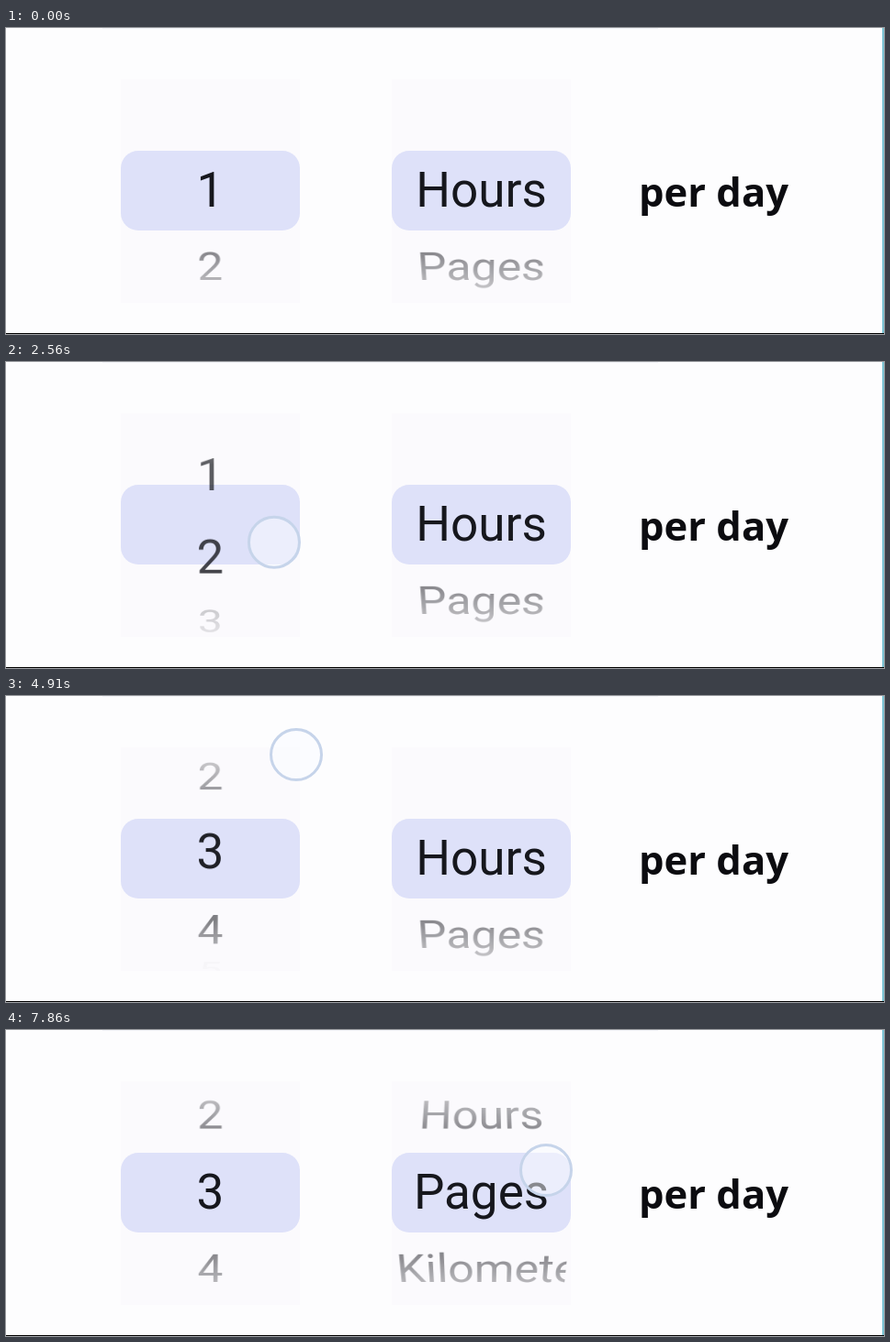
Recreate the animation shown at these times as an HTML page. Size 956 px wide and 334 px high, loop 8 s.

```html
<!DOCTYPE html>
<html lang="en">
<head>
<meta charset="utf-8">
<title>Goal picker</title>
<style>
  html, body { margin: 0; width: 100%; height: 100%; overflow: hidden; }
  #stage { position: relative; width: 956px; height: 334px; overflow: hidden; background: #fdfdfe; }
  #stage div { position: absolute; }
  .column { top: 56px; width: 195px; height: 244px; background: #fbfafd; }
  .selection { top: 77.5px; width: 100%; height: 87.5px; border-radius: 19px; background: #dee1f9; }
  .wheel {
    inset: 0; overflow: hidden;
    -webkit-mask-image: linear-gradient(#0004, #000 56px, #000 188px, #0004);
    mask-image: linear-gradient(#0004, #000 56px, #000 188px, #0004);
  }
  .item {
    top: 79px; width: 100%; height: 84px; overflow: hidden; color: #16171d;
    font: 53px/84px Roboto, sans-serif; text-align: center; white-space: nowrap;
  }
  #caption {
    left: 670.5px; top: 147.5px; width: 200px; text-align: center; white-space: nowrap;
    font: 600 43.5px/60px "Noto Sans", sans-serif; color: #0c0c10;
  }
  #touch {
    left: -29px; top: -29px; width: 58px; height: 58px; box-sizing: border-box;
    border: 3px solid #c6d4ea; border-radius: 50%; background: rgba(250, 251, 255, .5);
  }
  #topEdge { left: 105px; top: 0; width: 605px; height: 1px; background: #f2f3f8; }
  #rightEdge { right: 0; top: 0; width: 2px; height: 333px; background: #7cc4d4; }
  #bottomEdge { left: 0; bottom: 0; width: 100%; height: 1px; background: #000; }
</style>
</head>
<body>
<div id="stage">
  <div id="topEdge"></div>
  <div id="caption">per day</div>
  <div id="touch"></div>
  <div id="rightEdge"></div>
  <div id="bottomEdge"></div>
</div>
<script>
const LOOP = 8000;
const RADIUS = 122;       // half the wheel height
const STEP = 43.5;        // degrees between neighbouring items
const stage = document.getElementById('stage');
const touch = document.getElementById('touch');

// Tracks are [time, value...]
const countTrack = [[2000, 0], [2250, .2], [3120, 1.43], [3780, 2.163], [4350, 2.23], [4910, 2.075], [5400, 2]];
const unitTrack = [[6860, 0], [7000, .1], [7600, .87], [7860, 1]];
const drags = [
  { from: 1880, to: 5600, track: [[2000, 278, 263], [2250, 283, 240], [3120, 306, 113], [3780, 310, 50],
                                  [4350, 312, 41], [4910, 316, 64], [5400, 319, 75]] },
  { from: 6780, to: LOOP, track: [[6860, 566, 263], [7000, 569, 252], [7600, 585, 167], [7860, 588, 153]] }
];

function addDiv(parent, className, text = '') {
  const div = document.createElement('div');
  div.className = className;
  div.textContent = text;
  parent.append(div);
  return div;
}

function makeColumn(left, labels) {
  const column = addDiv(stage, 'column');
  column.style.left = left + 'px';
  addDiv(column, 'selection');
  const wheel = addDiv(column, 'wheel');
  return labels.map(label => addDiv(wheel, 'item', label));
}

// Smooth curve through the track with flat ends and flat turning points
function sample(track, time, channel = 1) {
  const last = track.length - 1;
  if (time <= track[0][0]) return track[0][channel];
  if (time >= track[last][0]) return track[last][channel];
  const i = track.findIndex(key => key[0] > time) - 1;
  const rate = k => (track[k + 1][channel] - track[k][channel]) / (track[k + 1][0] - track[k][0]);
  const slope = k => {
    if (k === 0 || k === last) return 0;
    const a = rate(k - 1), b = rate(k);
    return a * b > 0 ? 2 * a * b / (a + b) : 0;
  };
  const span = track[i + 1][0] - track[i][0];
  const u = (time - track[i][0]) / span, v = 1 - u;
  return v * v * (1 + 2 * u) * track[i][channel] + u * u * (3 - 2 * u) * track[i + 1][channel]
    + span * u * v * (v * slope(i) - u * slope(i + 1));
}

function turnWheel(items, position) {
  items.forEach((item, i) => {
    const angle = (i - position) * STEP;
    const visible = Math.abs(angle) < 85;
    item.style.display = visible ? '' : 'none';
    if (!visible) return;
    const radians = angle * Math.PI / 180;
    const depth = RADIUS * (1 - Math.cos(radians));
    item.style.transform = `translateY(${RADIUS * Math.sin(radians)}px) perspective(576px) ` +
      `translateZ(${-depth}px) rotateX(${-.75 * angle}deg)`;
    item.style.opacity = 1 - Math.abs(angle) / 90;
  });
}

const counts = makeColumn(124.5, ['1', '2', '3', '4', '5']);
const units = makeColumn(419.5, ['Hours', 'Pages', 'Kilometers']);
stage.append(touch);

function draw(time) {
  turnWheel(counts, sample(countTrack, time));
  turnWheel(units, sample(unitTrack, time));
  const drag = drags.find(d => time >= d.from && time < d.to);
  touch.style.display = drag ? '' : 'none';
  if (drag) {
    touch.style.transform = `translate(${sample(drag.track, time, 1)}px, ${sample(drag.track, time, 2)}px)`;
  }
}

const start = performance.now();
function tick() {
  draw((performance.now() - start) % LOOP);
  requestAnimationFrame(tick);
}
tick();
</script>
</body>
</html>
```
